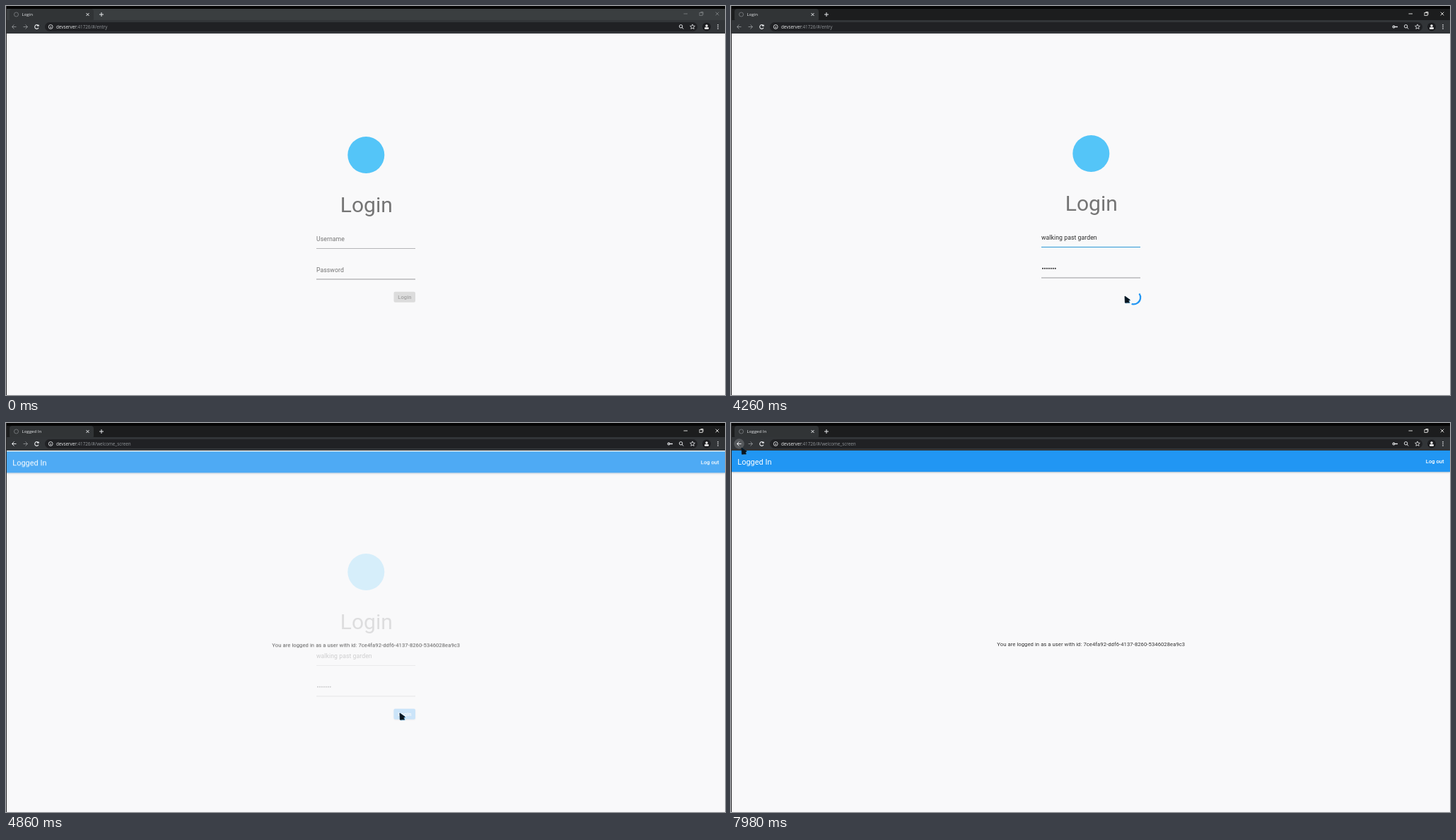
Write an HTML page with a canvas that moves like this. It is 1017 px wide and 551 px high and loops after 8000 ms.

```html
<!DOCTYPE html>
<html lang="en">
<head>
<meta charset="utf-8">
<title>Login flow</title>
<style>
html, body { margin: 0; width: 100%; height: 100%; overflow: hidden; background: #f9f9fa; }
canvas { display: block; width: 1017px; height: 551px; }
</style>
</head>
<body>
<canvas id="stage" width="1017" height="551"></canvas>
<script>
const W = 1017, H = 551, LOOP = 8000;
const stage = document.getElementById('stage').getContext('2d');
const layer = Object.assign(document.createElement('canvas'), { width: W, height: H });
const layerCtx = layer.getContext('2d');
let ctx = stage;

const BLUE = '#2196f3', PAGE = '#f9f9fa', INK = '#2b2b2b', GREY = '#757575';
const LIGHT = '#e8eaed', DIM = '#85888b';
const ROBOTO = 'Roboto, sans-serif', UI = '"Open Sans", sans-serif';
const HOST = 'devserver', PORT = ':41726/#/';
const USER = 'walking past garden';
const USER_ID = '7ce4fa92-ddf6-4137-8260-5346028ea9c3';

// Page layout
const BAR = 39, CENTER = 509.3, LEFT = 439, FIELD = 140, RIGHT = LEFT + FIELD;
const USER_LINE = 343.4, PASS_LINE = 387, ICON_Y = 29.5, TAB_Y = 11.5;

// Moments of the story, in ms
const ACTIVE = 60, FOCUS = 880, FILLED = 1750, SUBMIT = 4020, DONE = 4580;
const ROUTE = 4600, ROUTE_TIME = 300, HOVER = 7380;

const clamp = v => Math.max(0, Math.min(1, v));
const mix = (a, b, k) => a + (b - a) * k;

function glide(t, start, duration) {
  const v = clamp((t - start) / duration);
  return v * v * (3 - 2 * v);
}

function bezier(x1, y1, x2, y2) {
  const axis = (a, b, u) => 3 * a * u * (1 - u) ** 2 + 3 * b * u * u * (1 - u) + u ** 3;
  return x => {
    if (x <= 0 || x >= 1) return clamp(x);
    let lo = 0, hi = 1;
    for (let i = 0; i < 24; i++) {
      const mid = (lo + hi) / 2;
      if (axis(x1, x2, mid) < x) lo = mid; else hi = mid;
    }
    return axis(y1, y2, lo);
  };
}
const fastOutSlowIn = bezier(0.4, 0, 0.2, 1);
const easeIn = bezier(0.42, 0, 1, 1);

function rect(x, y, w, h, color, radius = 0) {
  ctx.fillStyle = color;
  ctx.beginPath();
  ctx.roundRect(x, y, w, h, radius);
  ctx.fill();
}

function disc(x, y, r, color) {
  ctx.fillStyle = color;
  ctx.beginPath();
  ctx.arc(x, y, r, 0, Math.PI * 2);
  ctx.fill();
}

function ring(x, y, r, color, width = 1, from = 0, to = Math.PI * 2) {
  ctx.strokeStyle = color;
  ctx.lineWidth = width;
  ctx.beginPath();
  ctx.arc(x, y, r, from, to);
  ctx.stroke();
}

function line(x1, y1, x2, y2, color, width = 1) {
  ctx.strokeStyle = color;
  ctx.lineWidth = width;
  ctx.beginPath();
  ctx.moveTo(x1, y1);
  ctx.lineTo(x2, y2);
  ctx.stroke();
}

function frame(x, y, size, color) {
  ctx.strokeStyle = color;
  ctx.lineWidth = 0.9;
  ctx.strokeRect(x, y, size, size);
}

function text(str, x, y, font, color, align = 'left', spacing = 0) {
  ctx.font = font;
  ctx.letterSpacing = spacing + 'px';
  ctx.textAlign = align;
  ctx.fillStyle = color;
  ctx.fillText(str, x, y);
  return ctx.measureText(str).width;
}

function withShadow(blur, drop, paint) {
  ctx.save();
  ctx.shadowColor = 'rgba(0,0,0,0.3)';
  ctx.shadowBlur = blur;
  ctx.shadowOffsetY = drop;
  paint();
  ctx.restore();
}

function cross(x, y, r, color) {
  line(x - r, y - r, x + r, y + r, color);
  line(x - r, y + r, x + r, y - r, color);
}

function plus(x, y, r, color) {
  line(x - r, y, x + r, y, color);
  line(x, y - r, x, y + r, color);
}

function arrow(x, dir, color, r = 3) {
  const tip = x + r * dir;
  line(x - r * dir, ICON_Y, tip, ICON_Y, color);
  for (const side of [-r, r]) line(x, ICON_Y + side, tip, ICON_Y, color);
}

function star(x, y, r) {
  ctx.strokeStyle = LIGHT;
  ctx.lineWidth = 0.8;
  ctx.beginPath();
  for (let i = 0; i < 10; i++) {
    const a = (i / 5 - 0.5) * Math.PI, k = i % 2 ? r * 0.45 : r;
    ctx.lineTo(x + k * Math.cos(a), y + k * Math.sin(a));
  }
  ctx.closePath();
  ctx.stroke();
}

function drawTabs(active, routed) {
  rect(0, 0, W, BAR, active ? '#1c1d1e' : '#3a3e40');
  rect(0, 0, W, 4, '#050505');
  rect(5, 4, 119, 18, '#313436', 4);
  rect(0, 20, W, BAR - 20, '#323538');
  ring(14.5, 12, 3, '#707376');
  text(routed ? 'Logged In' : 'Login', 22.5, 14.2, '6.1px ' + UI, LIGHT);
  cross(115.5, 12, 2, LIGHT);
  plus(135, 12, 3, LIGHT);

  const color = active ? '#d8d8d6' : '#74787a';
  line(958.5, TAB_Y - 0.5, 964, TAB_Y - 0.5, color);
  frame(981, TAB_Y - 2, 4, color);
  line(982.5, TAB_Y - 3, 986, TAB_Y - 3, color);
  line(986, TAB_Y - 3, 986, TAB_Y + 1, color);
  cross(1006, TAB_Y - 0.5, 2.3, color);
}

function drawToolbar(t, routed) {
  const y = ICON_Y;
  disc(11.5, y, 7.2, `rgba(110,113,116,${0.6 * clamp((t - HOVER) / 100)})`);
  arrow(11.5, -1, routed ? LIGHT : DIM);
  arrow(27.5, 1, DIM);
  ring(43.5, y, 2.8, LIGHT, 1.1, 0.5, 5.5);
  rect(44, y - 2.8, 2.8, 2, LIGHT);

  rect(55, 23, 923, 13, '#202124', 6.5);
  ring(63.2, y, 2.9, LIGHT, 0.9);
  line(63.2, y - 0.5, 63.2, y + 1.7, LIGHT);
  const font = '6.3px ' + UI;
  const hostWidth = text(HOST, 71, y + 2.2, font, '#eceef0');
  text(PORT + (routed ? 'welcome_screen' : 'entry'), 71 + hostWidth, y + 2.2, font, '#92969a');

  if (t >= FILLED) {
    ring(937.4, y, 1.4, LIGHT, 1.1);
    line(939, y, 943, y, LIGHT, 1.4);
  }
  ring(954.6, y - 0.7, 2.2, LIGHT);
  line(956, y + 0.8, 958.3, y + 3, LIGHT);
  star(971, y, 3.6);
  disc(991, y, 6, '#1c1d20');
  disc(991, y - 1.5, 1.7, '#fff');
  rect(988, y + 0.8, 6, 2.5, '#fff', 1);
  for (let i = -1; i <= 1; i++) disc(1007, y + i * 2.6, 0.8, LIGHT);
}

function drawSpinner(x, y, elapsed) {
  const cycle = (elapsed / 1333) % 1, turn = (elapsed / 2222) % 1;
  const head = fastOutSlowIn(clamp(cycle * 2));
  const tail = fastOutSlowIn(clamp(cycle * 2 - 1));
  const start = Math.PI * (1.5 * tail + 2 * turn + 0.5 * cycle - 0.5);
  ring(x, y, 9.6, BLUE, 2.2, start, start + Math.max(0.01, 1.5 * Math.PI * (head - tail)));
}

function drawFields(t) {
  const filled = t >= FILLED, focused = t >= FOCUS && t < DONE;
  const font = '8.7px ' + ROBOTO;
  const label = (str, bottom, color) => text(str, LEFT, bottom - 10.4, font, color, 'left', 0.06);

  const typed = label(filled ? USER : 'Username', USER_LINE, filled ? INK : GREY);
  rect(LEFT, USER_LINE - 0.4, FIELD, 0.8, '#a0a0a2');
  if (focused) {
    const blinkOn = Math.floor((t - (filled ? FILLED : FOCUS)) / 500) % 2 === 0;
    if (blinkOn) rect(LEFT + (filled ? typed : 0), USER_LINE - 18.6, 1, 10.6, BLUE);
    ctx.globalAlpha = clamp((t - FOCUS) / 160);
    rect(LEFT, USER_LINE - 0.5, FIELD, 1.1, '#2b98d6');
    ctx.globalAlpha = 1;
  }

  if (filled) for (let i = 0; i < 7; i++) disc(441 + i * 2.95, PASS_LINE - 13.2, 1.05, INK);
  else label('Password', PASS_LINE, GREY);
  rect(LEFT, PASS_LINE - 0.4, FIELD, 0.8, '#97979c');
}

function drawLogin(t) {
  const busy = t >= SUBMIT && t < DONE, filled = t >= FILLED;
  rect(0, BAR, W, H - BAR, PAGE);
  ctx.save();
  if (busy) ctx.translate(0, -2);
  disc(CENTER, 211, 26, '#54c5f8');
  text('Login', CENTER + 0.5, 292, '30px ' + ROBOTO, GREY, 'center');
  drawFields(t);
  ctx.restore();

  if (busy) return drawSpinner(RIGHT - 9.4, 412.8, t - SUBMIT);
  const button = () => rect(RIGHT - 30.5, 404.7, 30.5, 15, filled ? BLUE : '#dcdcdc', 2);
  if (filled) withShadow(2, 0.7, button); else button();
  text('Login', RIGHT - 15.1, 415, '500 7.6px ' + ROBOTO, filled ? '#fff' : '#a3a3a3', 'center', 0.1);
}

function drawHome() {
  rect(0, BAR, W, H - BAR, PAGE);
  withShadow(3, 1, () => rect(0, BAR, W, 30.3, BLUE));
  text('Logged In', 9.3, 58.5, '10.9px ' + ROBOTO, '#fff', 'left', 0.03);
  text('Log out', 1008.5, 57, '500 7.6px ' + ROBOTO, '#fff', 'right');
  text('You are logged in as a user with id: ' + USER_ID, CENTER, 316.2,
    '7.63px ' + ROBOTO, '#333', 'center', 0.08);
}

// The new page fades in as one flattened layer
function drawPages(t) {
  const p = (t - ROUTE) / ROUTE_TIME;
  if (p < 1) drawLogin(t);
  if (p <= 0) return;
  if (p >= 1) return drawHome();
  ctx = layerCtx;
  ctx.clearRect(0, 0, W, H);
  drawHome();
  ctx = stage;
  ctx.save();
  ctx.globalAlpha = easeIn(p);
  const slide = (H - BAR) / 4 * (1 - fastOutSlowIn(p));
  ctx.drawImage(layer, 0, BAR, W, H - BAR, 0, BAR + slide, W, H - BAR);
  ctx.restore();
}

function mouseAt(t) {
  const enter = glide(t, ACTIVE, 540), toButton = glide(t, 2850, 400), toBack = glide(t, 5354, 768);
  const dip = Math.sin(Math.PI * clamp((t - 6620) / 700)) ** 2;
  const x = mix(mix(mix(505, 473, enter), 557, toButton), 15, toBack);
  const y = mix(mix(mix(408, 327, enter), 411, toButton), 35, toBack);
  return [x, y + 5 * dip];
}

function drawMouse(t) {
  if (t < ACTIVE) return;
  const [x, y] = mouseAt(t);
  const overLine = bottom => y > bottom - 24 && y < bottom;
  const overField = x > LEFT && x < RIGHT && (overLine(USER_LINE) || overLine(PASS_LINE));
  ctx.save();
  ctx.translate(x, y);
  if (t < ROUTE && overField) {
    line(0, -4.5, 0, 4.5, '#4a4a4a', 0.9);
    for (const end of [-4.8, 4.8]) line(-1.8, end, 1.8, end, '#4a4a4a', 0.9);
  } else {
    const pointer = new Path2D('M0 0 L7.2 5.2 L5.2 6.6 L6.4 9 L3.6 9 L0.4 9.2 Z');
    ctx.lineJoin = 'round';
    ctx.strokeStyle = '#3f9bd0';
    ctx.translate(0.7, 0.7);
    ctx.stroke(pointer);
    ctx.translate(-0.7, -0.7);
    ctx.fillStyle = ctx.strokeStyle = '#0a1620';
    ctx.fill(pointer);
    ctx.stroke(pointer);
  }
  ctx.restore();
}

function draw(now) {
  const t = now % LOOP, routed = t >= ROUTE;
  drawPages(t);
  drawTabs(t >= ACTIVE, routed);
  drawToolbar(t, routed);
  rect(0, 0, 1, H, '#2a2a2c');
  drawMouse(t);
  requestAnimationFrame(draw);
}
draw(0);
</script>
</body>
</html>
```
